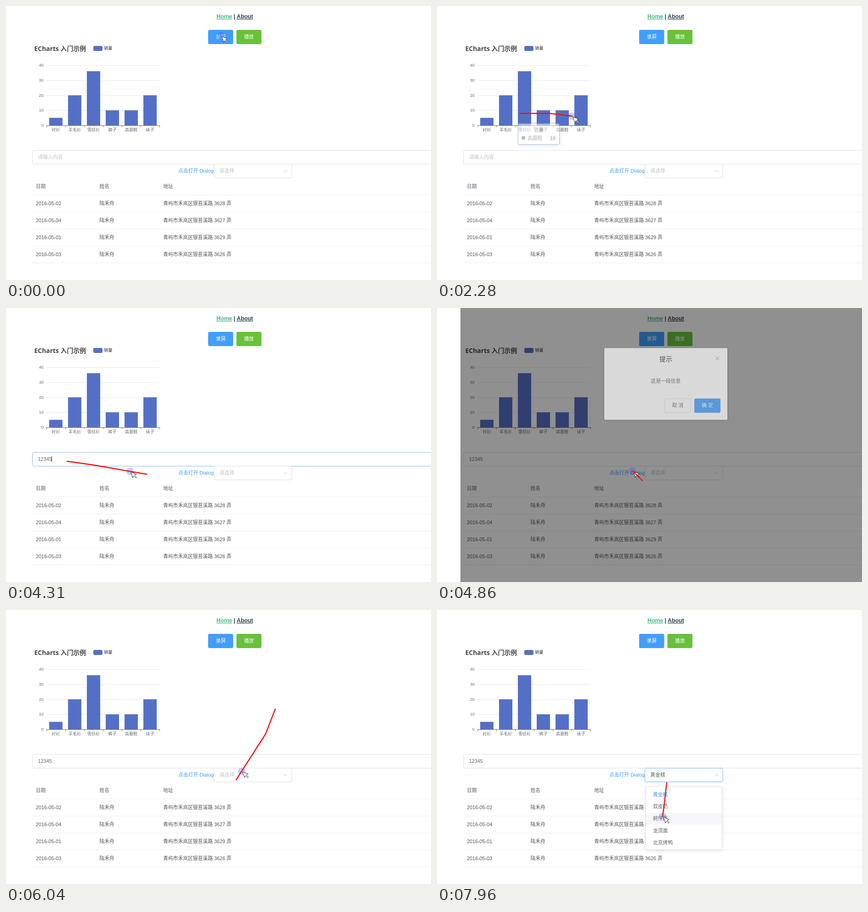
An HTML page that plays this animation: 925x597 px, repeating every 8000 ms.

```html
<!DOCTYPE html>
<html lang="zh-CN">
<head>
<meta charset="utf-8">
<title>Session replay</title>
<style>
html, body { margin: 0; width: 100%; height: 100%; overflow: hidden; background: #fff; }
svg { display: block; width: 925px; height: 597px; }
text { font: 10.8px "Liberation Sans", "Noto Sans CJK SC", "Noto Sans CJK", sans-serif; fill: #606266; white-space: pre; }
.mid { text-anchor: middle; }
.end { text-anchor: end; }
.bold { font-weight: 700; }
.nav { font-size: 12.3px; font-weight: 700; fill: #2c3e50; }
.nav .on { fill: #42b983; }
.nav .link { text-decoration: underline; }
.title { font: 700 13.9px "Open Sans", "Noto Sans CJK SC", "Noto Sans CJK", sans-serif; fill: #464646; }
.small { font-size: 9.24px; fill: #6e7079; }
.legend { font-size: 9.24px; fill: #333; }
.white { fill: #fff; }
.blue { fill: #409eff; }
.head { font-weight: 700; fill: #909399; }
.cell { fill: #505358; }
.hint { fill: #c0c4cc; }
.tip { fill: #666; }
.dialog-title { font-size: 13.9px; fill: #303133; }
.box { fill: #fff; stroke: #dcdfe6; }
.rule { stroke: #ebeef5; }
.icon { fill: none; stroke: #c0c4cc; }
#modal { filter: drop-shadow(0 1px 2px rgba(0, 0, 0, .3)); }
#drop { filter: drop-shadow(0 2px 4px rgba(0, 0, 0, .12)); }
#tip { filter: drop-shadow(1px 2px 4px rgba(0, 0, 0, .2)); }
</style>
</head>
<body>
<svg id="stage" viewBox="0 0 925 597"></svg>
<script>
const LOOP = 8000, TAIL = 450, LAG = 50;
const OPEN_DIALOG = 4745, CLOSE_DIALOG = 5495;
const OPEN_LIST = 6510, PICK = 6920, REOPEN = 7300;
const KEYS = [3260, 3390, 3520, 3780, 4050];
const items = ['衬衫', '羊毛衫', '雪纺衫', '裤子', '高跟鞋', '袜子'];
const sales = [5, 20, 36, 10, 10, 20];
const foods = ['黄金糕', '双皮奶', '蚵仔煎', '龙须面', '北京烤鸭'];
const rows = [['02', 3628], ['04', 3627], ['01', 3629], ['03', 3626]];

// Pointer route: time, x, y
const route = [
  [90, 468, 65], [420, 350, 120], [800, 313, 206], [1060, 280, 231], [1830, 180, 234],
  [1930, 246, 234], [2060, 286, 239], [2230, 294, 240], [2300, 294, 240], [2420, 306, 242],
  [2560, 306, 246], [2760, 240, 293], [3010, 133, 334], [4040, 133, 334], [4150, 190, 342],
  [4310, 305, 362], [4410, 447, 376], [4560, 426, 355], [4940, 426, 355], [5030, 501, 358],
  [5090, 541, 351], [5160, 553, 318], [5290, 567, 245], [5410, 585, 218], [5640, 586, 216],
  [5780, 565, 270], [6040, 501, 370], [6560, 501, 370], [6700, 488, 401], [6960, 488, 402],
  [7180, 500, 370], [7510, 500, 376], [7720, 495, 420], [7910, 491, 450]
];

const text = (x, y, s, cls = '', id = '') =>
  `<text x="${x}" y="${y}" class="${cls}" id="${id}">${s}</text>`;
const rect = (x, y, w, h, attrs = '') =>
  `<rect x="${x}" y="${y}" width="${w}" height="${h}" ${attrs}/>`;
const line = (x1, y1, x2, y2, attrs) =>
  `<path d="M${x1} ${y1}L${x2} ${y2}" ${attrs}/>`;
const barX = i => 94 + 41 * i;
const barTop = i => 260 - sales[i] * 3.275;

function header() {
  return `<text x="458" y="27" class="nav"><tspan class="on link">Home</tspan> | <tspan class="link">About</tspan></text>` +
    rect(440, 52, 54.5, 31, 'rx="3" fill="#409eff"') + text(467.5, 71, '录屏', 'mid white') +
    rect(501.5, 52, 54.5, 31, 'rx="3" fill="#67c23a"') + text(528.8, 71, '播放', 'mid white');
}

function chart() {
  let s = text(61.5, 97.5, 'ECharts 入门示例', 'title') +
    rect(190, 87, 20, 11, 'rx="3" fill="#5470c6"') + text(213, 95, '销量', 'legend');
  for (let v = 0; v <= 40; v += 10) {
    const y = Math.round(260 - v * 3.275);
    s += text(82, y + 2.5, v, 'small end');
    if (v) s += line(88, y + .5, 334, y + .5, 'stroke="#e6eaf2"');
  }
  items.forEach((name, i) => {
    s += rect(barX(i), barTop(i), 29, 260 - barTop(i), 'class="bar"') +
      text(barX(i) + 14.5, 273, name, 'small mid');
  });
  for (let i = 0; i <= 6; i++) s += line(88.5 + 41 * i, 260, 88.5 + 41 * i, 264, 'stroke="#6e7079"');
  return s + line(88, 260.5, 335, 260.5, 'stroke="#6e7079"');
}

function form() {
  return rect(57.5, 314.5, 900, 30, 'rx="3" class="box" id="field"') +
    text(69.8, 333, '请输入内容', 'hint', 'typed') +
    line(0, 323, 0, 335, 'stroke="#303133" id="caret"') +
    text(375, 363, '点击打开 Dialog', 'blue') +
    rect(452.5, 344.5, 169.5, 30, 'rx="3" class="box" id="select"') +
    text(464.3, 363, '请选择', 'hint', 'choice') +
    '<path d="M604.5 357.5l4 4l4 -4" class="icon" id="chevron"/>';
}

function table() {
  let s = '';
  ['日期', '姓名', '地址'].forEach((h, i) => s += text(65 + 138.5 * i, 397, h, 'head'));
  s += line(57, 411.5, 925, 411.5, 'class="rule"');
  rows.forEach(([day, no], i) => {
    const y = 434 + 37 * i, base = y + (i < 3 ? 15 : 14.5);
    s += text(65, y, '2016-05-' + day, 'cell') + text(203.5, y, '陆禾舟', 'cell') +
      text(342, y, `青屿市禾岚区银苔溪路 ${no} 弄`, 'cell') +
      line(57, base, 925, base, 'class="rule"');
  });
  return s;
}

function list() {
  let s = rect(454.5, 385, 165.5, 137, 'rx="3" fill="#fff" stroke="#e4e7ed"') +
    '<path d="M482 385.5l5 -5l5 5" fill="#fff" stroke="#ebeef5"/>' +
    rect(455, 0, 165, 26.4, 'fill="#f5f7fa" id="hover"');
  foods.forEach((f, i) => s += text(470, 406 + 26.2 * i, f, 'food'));
  return `<g id="drop">${s}</g>`;
}

function tooltip() {
  return `<g id="tip">${rect(.5, .5, 90, 46, 'rx="3" fill="#fff" stroke="#5470c6" id="tipBox"')}` +
    text(45, 19, '销量', 'tip mid', 'tipTitle') + '<circle cx="12" cy="32.5" r="4" fill="#5470c6"/>' +
    text(21, 36.5, '', 'tip', 'tipName') + text(82, 36.5, '', 'tip bold end', 'tipValue') + '</g>';
}

function dialog() {
  return rect(51, 0, 874, 597, 'id="shade"') + '<g id="modal">' +
    rect(364, 94, 268, 156.5, 'rx="2" fill="#fff"') + text(498, 123, '提示', 'dialog-title mid') +
    '<path d="M606.5 112.5l8 8m0 -8l-8 8" class="icon" style="stroke:#909399"/>' +
    text(498, 170, '这是一段信息', 'mid') +
    rect(495.5, 204.5, 56.5, 30, 'rx="3" class="box"') + text(524, 223, '取 消', 'mid') +
    rect(560, 204, 57, 31, 'rx="3" id="ok"') + text(588.5, 223, '确 定', 'mid white') + '</g>';
}

const pointer = '<g id="pointer"><circle r="8" fill="rgba(73,80,246,.3)"/>' +
  '<path d="M1.5 1.5L6 14L8.5 10L13 14.5L14.5 13L10 8.5L14 6Z" fill="#fff" stroke="#333" stroke-linejoin="round"/></g>' +
  '<path id="trail" fill="none" stroke="#ee1111" stroke-width="2.4" stroke-linecap="round" stroke-linejoin="round"/>';

const $ = id => document.getElementById(id);
$('stage').innerHTML = header() + chart() + form() + table() + tooltip() + list() + dialog() + pointer;
const bars = document.querySelectorAll('.bar');
const foodTexts = document.querySelectorAll('.food');

const clamp = v => Math.max(0, Math.min(1, v));
const ramp = (t, start, span) => clamp((t - start) / span);
const ease = v => 1 - (1 - v) ** 2.2;
const snap = v => 1 - (1 - v) ** 4;

function at(t) {
  const i = route.findIndex(p => p[0] >= t);
  if (i < 1) return route.at(i).slice(1); // before the first or after the last point
  const [t0, x0, y0] = route[i - 1], [t1, x1, y1] = route[i];
  const k = (t - t0) / (t1 - t0);
  return [x0 + (x1 - x0) * k, y0 + (y1 - y0) * k];
}

function barAt(t) {
  const [x, y] = at(t);
  return sales.findIndex((v, i) => x >= barX(i) && x <= barX(i) + 29 && y >= barTop(i) && y <= 260);
}

function drawTip(t) {
  const now = barAt(t);
  bars.forEach((b, i) => b.setAttribute('fill', i === now ? '#5c7bd9' : '#5470c6'));
  let age = 0;
  while (age < 300 && barAt(t - age) < 0) age += 5;
  const seen = barAt(t - age);
  $('tip').style.opacity = seen < 0 ? 0 : 1 - ramp(age, 100, 200);
  if (seen < 0) return;
  const [x, y] = at(t - age), w = 58.6 + 10.8 * items[seen].length;
  $('tip').setAttribute('transform', `translate(${x > 215 ? x - 20 - w : x + 20} ${y + 16})`);
  $('tipBox').setAttribute('width', w - 1);
  $('tipTitle').setAttribute('x', w / 2);
  $('tipName').textContent = items[seen];
  $('tipValue').textContent = sales[seen];
  $('tipValue').setAttribute('x', w - 9);
}

function drawForm(t) {
  const n = KEYS.filter(k => t >= k).length, focus = t >= 3030 && t < 4720;
  $('typed').textContent = n ? '12345'.slice(0, n) : '请输入内容';
  $('typed').setAttribute('class', n ? '' : 'hint');
  $('field').style.stroke = focus ? '#7fbcff' : '';
  $('caret').setAttribute('transform', `translate(${69.5 + 6 * n} 0)`);
  $('caret').style.opacity = focus ? 1 : 0;
}

function drawDialog(t) {
  const closing = t >= CLOSE_DIALOG;
  const fade = span => closing ? 1 - ease(ramp(t, CLOSE_DIALOG, span)) : ease(ramp(t, OPEN_DIALOG, span));
  const k = fade(300);
  $('shade').style.opacity = fade(190) * .5;
  $('modal').style.opacity = k;
  $('modal').setAttribute('transform', `translate(0 ${-20 * (1 - k)})`);
  const [x, y] = at(t);
  $('ok').setAttribute('fill', x > 560 && y > 204 && y < 235 ? '#66b1ff' : '#409eff');
}

function drawList(t) {
  const k = t < PICK ? snap(ramp(t, OPEN_LIST, 300))
    : t < REOPEN ? 1 - snap(ramp(t, PICK, 300)) : snap(ramp(t, REOPEN, 300));
  const picked = t >= PICK, y = at(t)[1];
  const row = y > 389 ? Math.floor((y - 389) / 26.2) : picked ? 0 : -1;
  $('drop').style.opacity = k;
  $('drop').setAttribute('transform', `translate(0 ${385 * (1 - k)}) scale(1 ${k})`);
  $('hover').setAttribute('y', 389 + 26.2 * row);
  $('hover').style.opacity = row < 0 ? 0 : 1;
  foodTexts[0].setAttribute('class', picked ? 'food blue' : 'food');
  $('choice').textContent = picked ? foods[0] : '请选择';
  $('choice').setAttribute('class', picked ? '' : 'hint');
  $('select').style.stroke = t >= OPEN_LIST ? '#66b1ff' : '';
  $('chevron').setAttribute('transform', `rotate(${180 * k} 608.5 359.5)`);
}

function drawPointer(t) {
  const path = [at(t - TAIL), ...route.filter(p => p[0] > t - TAIL && p[0] < t).map(p => p.slice(1)), at(t)];
  const still = path.every(p => Math.hypot(p[0] - path[0][0], p[1] - path[0][1]) < 1.5);
  $('trail').setAttribute('d', still ? '' : 'M' + path.map(p => p.join(' ')).join('L'));
  $('pointer').setAttribute('transform', `translate(${at(t - LAG)})`);
}

function frame() {
  const t = performance.now() % LOOP;
  drawTip(t);
  drawForm(t);
  drawDialog(t);
  drawList(t);
  drawPointer(t);
  requestAnimationFrame(frame);
}
frame();
</script>
</body>
</html>
```
